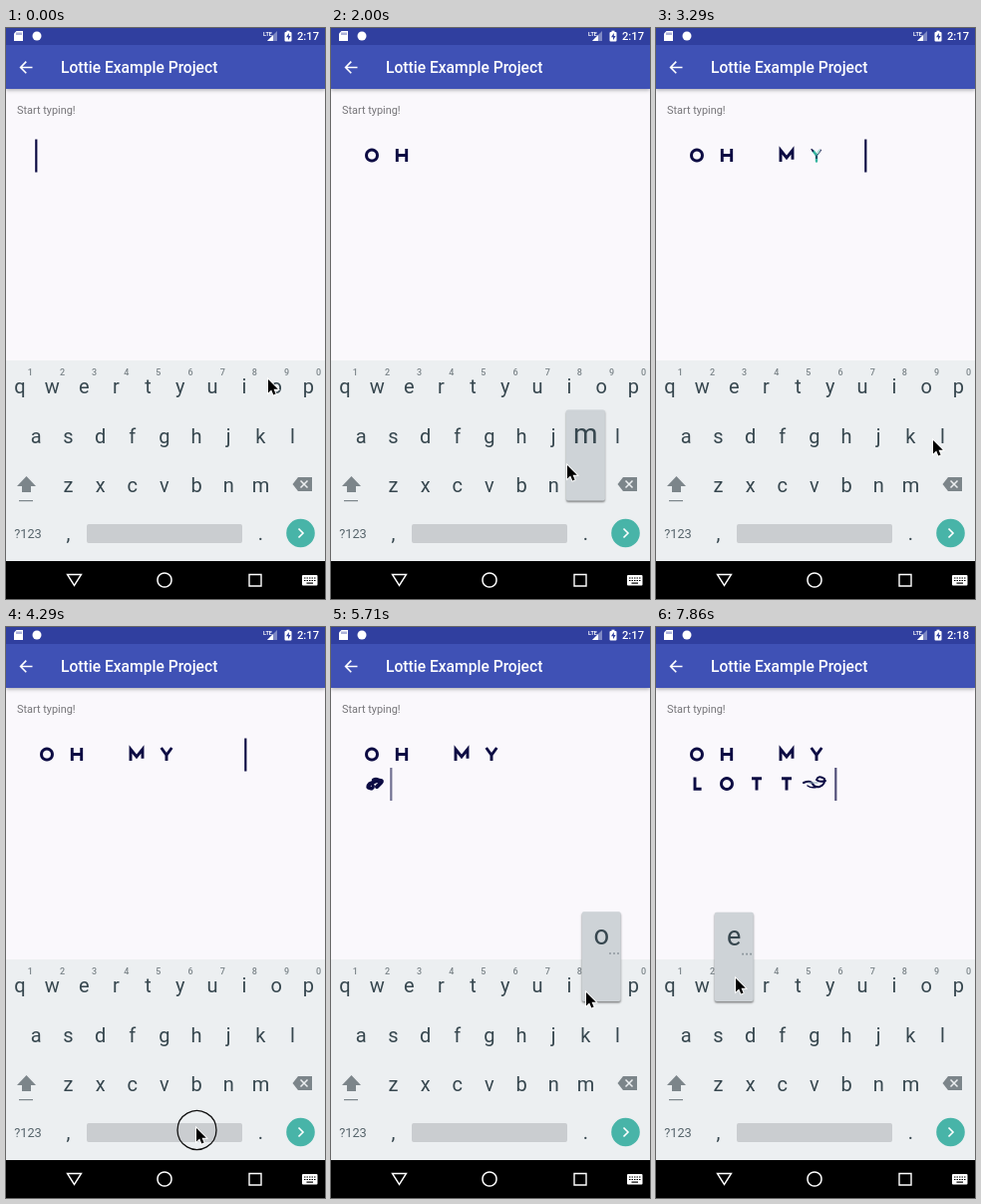
Animation, 320 px wide and 572 px high, one loop 8 s. Source, as an HTML page with a canvas:

```html
<!DOCTYPE html>
<html lang="en">
<head>
<meta charset="utf-8">
<title>Animated typing</title>
<style>
html, body { margin: 0; height: 100%; overflow: hidden; background: #faf8fc; }
canvas { display: block; width: 100vw; height: 100vh; }
</style>
</head>
<body>
<canvas id="stage"></canvas>
<script>
const W = 320, H = 572, LOOP = 8000;
const INK = '#0c0b43', TEAL = '#35b6a0', KEY = '#37474f', GREY = '#7c858a';
const canvas = document.getElementById('stage');
const ctx = canvas.getContext('2d');
const dpr = window.devicePixelRatio || 1;
canvas.width = W * dpr;
canvas.height = H * dpr;

const clamp = v => Math.max(0, Math.min(1, v));
const ramp = (v, a, b) => clamp((v - a) / (b - a));
const smooth = v => v * v * (3 - 2 * v);

function box(x, y, w, h, color, r = 0) {
  ctx.fillStyle = color;
  ctx.beginPath();
  ctx.roundRect(x, y, w, h, r);
  ctx.fill();
}
function disc(x, y, r, color) {
  ctx.fillStyle = color;
  ctx.beginPath();
  ctx.arc(x, y, r, 0, 7);
  ctx.fill();
}
function text(s, x, y, size, color, weight = 400, align = 'center') {
  ctx.font = `${weight} ${size}px Roboto, sans-serif`;
  ctx.textAlign = align;
  ctx.fillStyle = color;
  ctx.fillText(s, x, y);
}
function line(d, color, width) {
  ctx.strokeStyle = color;
  ctx.lineWidth = width;
  ctx.stroke(new Path2D(d));
}
function shape(d, color) {
  ctx.fillStyle = color;
  ctx.fill(new Path2D(d));
}

// Finished glyphs, centred on 0,0.
const GLYPHS = {
  o: 'M5.5 0A5.5 5.5 0 1 1 5.5 -.01',
  h: 'M-4.7-6.5V6.5M4.7-6.5V6.5M-4.7 0H4.7',
  m: 'M-6 6.5V-5L0 2.5 6-5V6.5',
  y: 'M-5.3-6.5L0 .8 5.3-6.5M0 0V6.5',
  l: 'M-2-6.5V5.2H4.6',
  t: 'M-5-5.2H5M0-5V6.5',
  i: 'M0-6.5V6.5'
};
// Strokes that dance before each glyph settles: [path, colour, width].
const INTROS = {
  o: [['M-5 4A6 6 0 1 1 5 4', INK, 2], ['M-3 3A4 4 0 0 0 5 0', TEAL, 2]],
  h: [['M-6 5Q-3-8 0 0T6-5', INK, 2], ['M-4-5L4 5', TEAL, 1.5]],
  m: [['M-7 6L-4-5 0 4 4-5 7 6', INK, 2], ['M-5 5L0-2 5 5', TEAL, 1.5]],
  y: [['M-4-5L0 0 4-5', INK, 1.8], ['M-3-4L0 0V6', TEAL, 2.4], ['M3-5L1-2', '#a8ddd2', 2]],
  l: [['M-1 4.5Q-6 4-2 0L5-3Q12-4 9-1L5 3', INK, 4], ['M1-4Q4-6 7-4', INK, 2.5], ['M0 5Q3 3 0 0', INK, 3]],
  t: [['M-6 1L-1 2 2 5', TEAL, 2.2], ['M-1 2L2 5', INK, 3.2], ['M2 1L7 5', '#b9d9dd', 1], ['M-5 5H7', '#8ccfc3', 1]],
  i: [['M-13-1Q-6-4-4 0T3 3Q9 1 8-5Q2-9 0-4Q3-1 9-3', INK, 2], ['M-9 2Q-5 5 1 3', INK, 1.5], ['M-8-1L1-1', '#8aa6b3', 1]]
};
const CLICKS = [
  ['o', 150], ['h', 720], [' ', 1250], ['m', 1820], ['y', 2430], [' ', 2780],
  [' ', 3800], [' ', 4230], [' ', 4500], ['l', 4960], ['o', 5570],
  ['t', 6130], ['t', 6580], ['i', 7130], ['e', 7740]
];
const COLUMNS = 9;
const typed = CLICKS.map(([key, press], i) => ({
  key, press, at: press + (key === ' ' ? 100 : 270),
  x: 30 + i % COLUMNS * 30, y: 127.5 + Math.floor(i / COLUMNS) * 29.5
}));

// Pointer rests: [arrive, leave, x, y].
const RESTS = [
  [0, 300, 263, 352], [650, 850, 190, 405], [1180, 1400, 165, 502],
  [1780, 2080, 237, 438], [2390, 2540, 174, 354], [2740, 2920, 185, 502],
  [3250, 3360, 278, 413], [3730, 4620, 191, 502], [4900, 5150, 286, 407],
  [5520, 5780, 256, 366], [6080, 6780, 143, 357], [7080, 7260, 238, 354],
  [7680, 8000, 80, 352]
];

const ROWS = [['qwertyuiop', 14, 366], ['asdfghjkl', 30.3, 415.5], ['zxcvbnm', 62.5, 464.5]];
const PITCH = 32.15;
const keys = {};
ROWS.forEach(([letters, x, y], row) => [...letters].forEach((c, i) => {
  keys[c] = { x: x + i * PITCH, y, digit: row ? '' : String((i + 1) % 10) };
}));

function drawBars(t) {
  box(0, 0, W, H, '#faf8fc');
  ctx.save();
  ctx.shadowColor = 'rgba(0,0,0,.35)';
  ctx.shadowBlur = 4 * dpr;
  ctx.shadowOffsetY = dpr;
  box(0, 0, W, 61, '#3f51b5');
  ctx.restore();
  box(0, 0, W, 17, '#303f9f');

  shape('M10.5 3H17V13H8V5.5Z', '#fff');
  line('M11 4.5V7M13 4.5V7M15 4.5V7', '#303f9f', .8);
  disc(31, 8, 4.5, '#fff');
  text('LTE', 262.5, 8, 5.5, '#fff', 700);
  shape('M272 3V13H262Z', '#7f89c4');
  shape('M268 7V13H262Z', '#fff');
  box(279.5, 4, 7, 9.5, '#fff', 1);
  box(281.5, 2.7, 3, 2, '#fff');
  shape('M283.8 5L281 9.3H283V12.3L285.6 8H283.8Z', '#303f9f');
  text(t < 6280 ? '2:17' : '2:18', 314, 12, 11.2, '#fff', 500, 'right');

  line('M26.5 39.5H15M20.3 33.6L14.6 39.5 20.3 45.3', '#fff', 1.6);
  text('Lottie Example Project', 55, 45, 15.6, '#fff', 500, 'left');
  text('Start typing!', 11, 85.5, 10.9, '#767579', 400, 'left');
}

function drawLetter({ key, x, y }, age) {
  if (!GLYPHS[key] || age < 0) return;
  const p = age / 1000;
  const settle = smooth(ramp(p, .54, .82));
  ctx.save();
  ctx.translate(x + 11, y);
  if (p < .95) {
    ctx.save();
    ctx.lineCap = ctx.lineJoin = 'round';
    ctx.setLineDash([55 * ramp(p, 0, .4) + .1, 200]);
    ctx.globalAlpha = 1 - ramp(p, .62, .95);
    for (const [d, color, width] of INTROS[key]) line(d, color, width);
    ctx.restore();
  }
  if (settle > 0) {
    ctx.setLineDash([40 * settle, 100]);
    line(GLYPHS[key], INK, 1 + 1.9 * settle);
  }
  ctx.restore();
}

function drawTyping(t) {
  const done = typed.filter(k => k.at <= t);
  done.forEach(k => drawLetter(k, t - k.at));
  const next = typed[done.length] || { x: 210, y: 157 };
  const age = t - (done.length ? done[done.length - 1].at : 0);
  ctx.globalAlpha = 1 - ramp(age, 420, 560) + ramp(age, 900, 1040);
  box(next.x - .8, next.y - 16, 2.2, 33, INK);
  ctx.globalAlpha = 1;
}

function drawKeyboard() {
  box(0, 333, W, 201, '#eceff1');
  for (const [c, k] of Object.entries(keys)) {
    text(c, k.x, k.y, 20, KEY);
    if (k.digit) text(k.digit, k.x + 10.3, 348, 9, GREY, 500);
  }
  shape('M20.5 449L30 459H25V465H16V459H11Z', GREY);
  box(13, 473, 14, 1.2, GREY);
  shape('M293 450H307V464H293L287.5 457Z', GREY);
  line('M295.5 453.5L302.5 460.5M302.5 453.5L295.5 460.5', '#eceff1', 1.5);
  text('?123', 22, 511, 12.8, '#56646b');
  text(',', 62.5, 513, 20, KEY);
  text('.', 255.5, 513, 20, KEY);
  box(81, 497, 156, 19, '#cacdd0', 2);
  disc(295.5, 506, 14.3, '#48b4a8');
  line('M293.5 501.5L298 506 293.5 510.5', '#fff', 1.6);

  box(0, 534, W, 38, '#000');
  line('M61.5 547.5H75.5L68.5 558.5Z', '#fff', 1.4);
  line('M166 553A7 7 0 1 1 166 552.99', '#fff', 1.5);
  line('M244 547.5H256V559H244Z', '#fff', 1.4);
  box(297, 548, 15.5, 10.5, '#fff', 1);
  ctx.setLineDash([1.5, 1]);
  line('M299 551H311M299 553.5H311', '#000', 1.2);
  ctx.setLineDash([]);
  box(301.5, 555.5, 6.5, 1.2, '#000');
}

function drawPopup({ key, press, at }, t) {
  const k = keys[key], age = t - press - 100;
  if (!k || age < 0 || t >= at) return;
  const rise = 2.5 * (1 - ramp(age, 0, 80));
  ctx.save();
  ctx.shadowColor = 'rgba(0,0,0,.45)';
  ctx.shadowBlur = 2 * dpr;
  ctx.shadowOffsetY = 1.5 * dpr;
  box(k.x - 19.5, k.y - 82 + rise, 39, 91 - rise, '#ced3d7', 2);
  ctx.restore();
  text(key, k.x, k.y - 49 + rise, 28 - rise / 2, KEY);
  if (k.digit) for (const dx of [9, 13, 17]) box(k.x + dx - 1, k.y - 41 + rise, 1.6, 1.6, '#7f8990');
}

function drawPointer(t) {
  let i = RESTS.length - 1;
  while (RESTS[i][0] > t) i--;
  const [, leave, x0, y0] = RESTS[i];
  const [arrive, , x1, y1] = RESTS[i + 1] || RESTS[i];
  const p = t > leave ? smooth(ramp(t, leave, arrive)) : 0;
  const x = x0 + (x1 - x0) * p, y = y0 + (y1 - y0) * p;
  ctx.save();
  ctx.translate(x, y);
  if (typed.some(k => t >= k.press && t < k.press + 100)) {
    line('M20 2A19.5 19.5 0 1 1 20 1.99', '#111', 1.3);
  }
  const arrow = 'M0 0V13.5L3.2 10.6 5.3 15.5 7.6 14.5 5.5 9.8H9.8Z';
  line(arrow, '#fff', 1.8);
  shape(arrow, '#000');
  ctx.restore();
}

function frame(now) {
  const t = now % LOOP;
  ctx.setTransform(dpr, 0, 0, dpr, 0, 0);
  drawBars(t);
  drawTyping(t);
  drawKeyboard();
  typed.forEach(k => drawPopup(k, t));
  drawPointer(t);
  requestAnimationFrame(frame);
}
requestAnimationFrame(frame);
</script>
</body>
</html>
```
